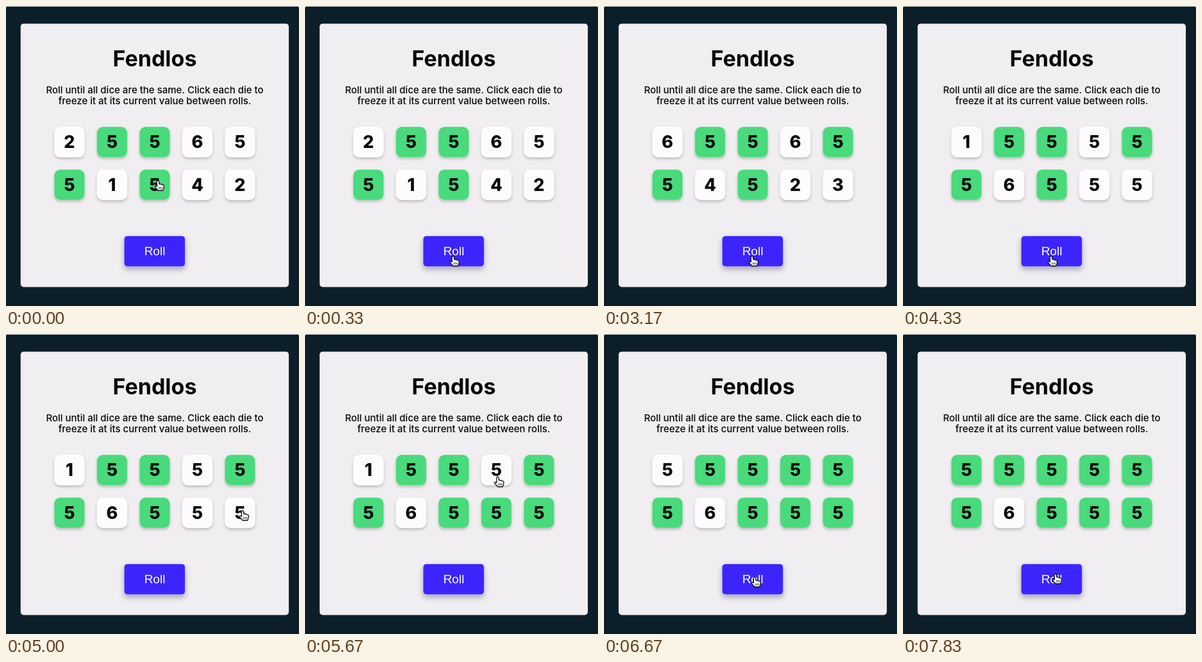
An HTML page with a canvas that plays this animation: 457x467 px, repeating every 8 s.

```html
<!DOCTYPE html>
<html lang="en">
<head>
<meta charset="utf-8">
<title>Dice game</title>
<style>
  html, body { margin: 0; width: 100%; height: 100%; overflow: hidden; background: #0d1e2b; }
  canvas { display: block; width: 457px; height: 467px; }
</style>
</head>
<body>
<canvas id="stage"></canvas>
<script>
const WIDTH = 457, HEIGHT = 467, CENTER = 232;
const LOOP = 8000, STEPS_PER_SECOND = 6;
const DIE = 47.5, PITCH = 66.5, LEFT = 75.2, TOP = 188;
const ROLL = -1;
const INK = '#060608';

const canvas = document.getElementById('stage');
const ctx = canvas.getContext('2d');
const ratio = window.devicePixelRatio || 1;
canvas.width = WIDTH * ratio;
canvas.height = HEIGHT * ratio;
ctx.scale(ratio, ratio);

const button = { x: 184.3, y: 358, w: 95, h: 47.5 };
const heldAtStart = [1, 2, 5, 7];

// Faces showing from each step on.
const rolls = [
  { step: 0, faces: '2556551542' },
  { step: 19, faces: '6556554523' },
  { step: 26, faces: '1555556555' },
  { step: 40, faces: '5555556555' }
];

// The pointer rests on a target from arrive to leave; leaving a die holds it.
const visits = [
  { arrive: 0, leave: 1, target: 7, dx: 5, dy: -7 },
  { arrive: 2, leave: 13, target: ROLL, dx: -1, dy: 7 },
  { arrive: 14, leave: 15, target: 4, dx: -8, dy: 1 },
  { arrive: 18, leave: 27, target: ROLL, dx: -1, dy: 7 },
  { arrive: 30, leave: 31, target: 9, dx: 4, dy: -4 },
  { arrive: 32, leave: 34, target: 8, dx: 4, dy: -4 },
  { arrive: 34, leave: 35, target: 3, dx: 2, dy: 10 },
  { arrive: 38, leave: 42, target: ROLL, dx: 3, dy: -4 },
  { arrive: 44, leave: 45, target: 0, dx: 3, dy: 1 },
  { arrive: 47, leave: 48, target: ROLL, dx: 6, dy: -9 }
];

const hand = new Path2D(
  'M-1.7 2Q0-1 1.7 2L2.1 6Q3.6 4.8 4.6 6.5Q6.2 5.5 7.1 7.3Q9.4 6.7 9.6 9' +
  'L9.1 12.4L7.8 16H.2L-4.9 10.2Q-4.7 7.6-1.4 9.7Z');
const fingers = new Path2D('M1.8 10.5v3.5m2.3-3.5v3.5m2.3-3.5v3.5');

const ease = p => p * p * (3 - 2 * p);
const mix = (a, b, p) => a + (b - a) * p;

const dieBox = i => ({
  x: LEFT + i % 5 * PITCH,
  y: TOP + Math.floor(i / 5) * PITCH,
  w: DIE,
  h: DIE
});

function restPoint({ target, dx, dy }) {
  const { x, y, w, h } = target === ROLL ? button : dieBox(target);
  return { x: x + w / 2 + dx, y: y + h / 2 + dy };
}

function pointerAt(step) {
  const index = visits.findLastIndex(visit => visit.arrive <= step);
  const visit = visits[index], next = visits[index + 1];
  const from = restPoint(visit);
  if (step <= visit.leave || !next) return from;
  const to = restPoint(next);
  const p = ease((step - visit.leave) / (next.arrive - visit.leave));
  return { x: mix(from.x, to.x, p), y: mix(from.y, to.y, p) };
}

const isHeld = (die, step) => heldAtStart.includes(die) ||
  visits.some(visit => visit.target === die && visit.leave <= step);

function fillBox({ x, y, w, h }, radius, color) {
  ctx.fillStyle = color;
  ctx.beginPath();
  ctx.roundRect(x, y, w, h, radius);
  ctx.fill();
}

// A box with a drop shadow and a soft light rim.
function raisedBox(box, radius, color, shadow) {
  ctx.save();
  ctx.shadowColor = shadow.color;
  ctx.shadowBlur = shadow.blur * ratio;
  ctx.shadowOffsetY = shadow.y * ratio;
  fillBox(box, radius, color);
  ctx.restore();
  ctx.strokeStyle = 'rgba(255,255,255,.28)';
  ctx.lineWidth = 1;
  ctx.stroke();
}

function label(text, x, baseline, font, color = INK) {
  ctx.font = font;
  ctx.fillStyle = color;
  ctx.fillText(text, x, baseline);
}

function drawPanel() {
  fillBox({ x: 0, y: 0, w: WIDTH, h: HEIGHT }, 0, '#d5d9dc');
  fillBox({ x: 0, y: 1, w: WIDTH, h: HEIGHT + 8 }, 2, '#0d1e2b');
  fillBox({ x: 22.8, y: 27.4, w: 418.3, h: 410.1 }, 4.8, '#f0eef0');
  label('Fendlos', CENTER, 94, '700 34px Inter, sans-serif');
  const body = '500 15px Inter, sans-serif';
  label('Roll until all dice are the same. Click each die to', CENTER, 136, body);
  label('freeze it at its current value between rolls.', CENTER, 153, body);
}

function drawDie(index, face, held) {
  const box = dieBox(index);
  raisedBox(box, 9.5, held ? '#48da7b' : '#fdfcfd',
    { color: 'rgba(0,0,0,.22)', blur: 4, y: 2.5 });
  label(face, box.x + DIE / 2, box.y + 33, '800 27px Inter, sans-serif');
}

function drawButton() {
  raisedBox(button, 5, '#3c25fc', { color: 'rgba(20,25,60,.34)', blur: 9, y: 4.5 });
  label('Roll', CENTER, 388.3, '400 19px "Liberation Sans", Arial, sans-serif', '#fff');
}

function drawPointer({ x, y }) {
  ctx.save();
  ctx.translate(x, y);
  ctx.lineJoin = 'round';
  ctx.fillStyle = '#fff';
  ctx.strokeStyle = '#111';
  ctx.lineWidth = 1.3;
  ctx.fill(hand);
  ctx.stroke(hand);
  ctx.lineWidth = 0.9;
  ctx.stroke(fingers);
  ctx.restore();
}

function draw(elapsed) {
  // The small lead keeps step changes from landing late through rounding.
  const step = Math.floor((elapsed % LOOP + 4) * STEPS_PER_SECOND / 1000);
  const { faces } = rolls.findLast(roll => roll.step <= step);
  ctx.textAlign = 'center';
  drawPanel();
  [...faces].forEach((face, i) => drawDie(i, face, isHeld(i, step)));
  drawButton();
  drawPointer(pointerAt(step));
}

const start = performance.now();
function tick() {
  draw(performance.now() - start);
  requestAnimationFrame(tick);
}
tick();
</script>
</body>
</html>
```
